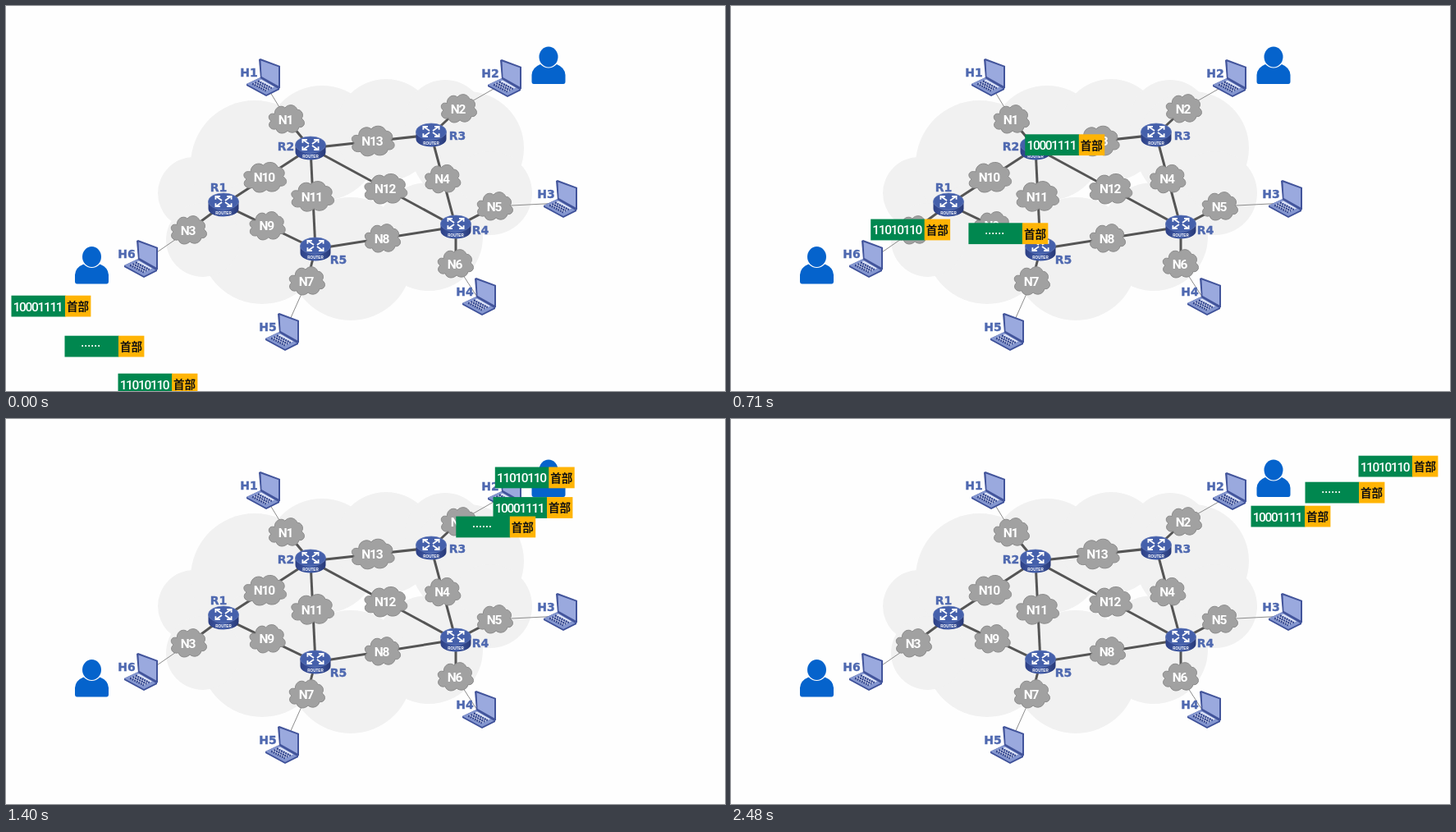
An HTML page for the animation above (2.55 s loop, 876 by 469 pixels).

```html
<!DOCTYPE html>
<html lang="zh">
<head>
<meta charset="utf-8">
<title>Packet switching</title>
<style>
html, body { margin: 0; width: 100%; height: 100%; overflow: hidden; background: #fefefe; }
svg { display: block; width: 876px; height: 469px; }
text { text-anchor: middle; }
.name { font: bold 14px "DejaVu Sans", sans-serif; fill: #4f69b0; stroke: #4f69b0; stroke-width: .4px; }
.net { font: bold 15.5px Roboto, "Liberation Sans", sans-serif; letter-spacing: -1.2px; fill: #fff; }
.tag { font: bold 4.6px "Liberation Sans", sans-serif; fill: #fff; }
.bits { font: 500 15.5px Roboto, "Liberation Sans", sans-serif; letter-spacing: -1.35px; fill: #fff; }
.dots { font: bold 12px "Liberation Sans", sans-serif; fill: #fff; }
.head { font: bold 13.5px "Noto Sans CJK SC", "Noto Sans CJK", sans-serif; fill: #111; }
</style>
</head>
<body>
<svg id="stage" viewBox="0 0 876 469">
  <defs>
    <linearGradient id="side">
      <stop offset="0" stop-color="#2c3f85"/>
      <stop offset=".5" stop-color="#4560ab"/>
      <stop offset="1" stop-color="#273877"/>
    </linearGradient>
    <path id="puff" d="M-14-6C-14-14-6-17-2-13C2-18 10-17 12-11C18-11 20-4 17-1C23 3 20 10 14 9C13 15 5 17 1 13C-4 18-11 16-12 11C-19 13-23 6-18 2C-23-2-20-8-14-6Z"
      fill="#a1a1a1" stroke="#8b8b8b" vector-effect="non-scaling-stroke"/>
    <path id="arrow" d="M2-1L9-6M4-6.2H9.6V-2.2" fill="none" stroke="#fff" stroke-width="1.8"/>
    <g id="router">
      <path d="M-18.5-4V5A18.5 9.5 0 0 0 18.5 5V-4Z" fill="url(#side)"/>
      <ellipse cy="-4" rx="18.5" ry="10" fill="#4560ab" stroke="#6279b8" stroke-width=".7"/>
      <g transform="translate(0 -4)">
        <use href="#arrow"/>
        <use href="#arrow" transform="scale(-1 1)"/>
        <use href="#arrow" transform="scale(1 -1)"/>
        <use href="#arrow" transform="scale(-1 -1)"/>
      </g>
      <text class="tag" y="12">ROUTER</text>
    </g>
    <g id="laptop">
      <path d="M-21 8L-4 0L19 13V15L3 23L-21 10Z" fill="#3d5099"/>
      <path d="M-21 8L-4 0L19 13L3 21Z" fill="#8496cf"/>
      <path d="M-15 8L-3 2.5L13 11.5L2 17Z" fill="#dfe5f7"/>
      <path d="M-14 7.6L3 16.4M-10.6 6L6.4 14.8M-7.2 4.4L9.8 13.2" stroke="#33468f" stroke-width="2.4" stroke-dasharray="2.2 .7"/>
      <path d="M-6-22L-4-23L20-14V13L18 14L-4 1Z" fill="#42549b"/>
      <path d="M-3.5-20.5L18-12.8V10.5L-2.5-1Z" fill="#9aa9de"/>
    </g>
    <g id="user" fill="#0563cc">
      <ellipse rx="11.5" ry="12.5"/>
      <path d="M-18 33Q-20.5 33-20.5 30V22Q-20 13-10 9Q0 18 10 9Q20 13 20.5 22V30Q20.5 33 18 33Z"/>
    </g>
  </defs>
</svg>
<script>
const NS = 'http://www.w3.org/2000/svg';
const stage = document.getElementById('stage');

function add(tag, attrs, parent = stage) {
  const el = document.createElementNS(NS, tag);
  for (const k in attrs) el.setAttribute(k, attrs[k]);
  parent.appendChild(el);
  return el;
}
function label(cls, x, y, str, parent) {
  add('text', { class: cls, x, y }, parent).textContent = str;
}
function put(id, [x, y], sx = 1, sy = 1) {
  add('use', { href: '#' + id, transform: `translate(${x} ${y}) scale(${sx} ${sy})` });
}
function link([x1, y1], [x2, y2], stroke, width) {
  add('line', { x1, y1, x2, y2, stroke, 'stroke-width': width });
}

const routers = { R1: [265, 242], R2: [371, 173], R3: [518, 157], R4: [548, 269], R5: [377, 296] };
const hosts = { H1: [314, 87], H2: [608, 88], H3: [676, 235], H4: [577, 354], H5: [337, 397], H6: [165, 308] };
const nets = { N1: [342, 138], N2: [552, 125], N3: [223, 273], N5: [596, 244], N6: [548, 314], N7: [367, 335] };
const nameSide = { R1: [-6, -16], R2: [-30, 3], R3: [32, 6], R4: [30, 9], R5: [28, 18] };

// Networks between two routers sit just short of the middle
const trunks = 'N4 R3 R4,N8 R5 R4,N9 R1 R5,N10 R1 R2,N11 R2 R5,N12 R4 R2,N13 R3 R2'
  .split(',').map(s => s.split(' '));
for (const [n, a, b] of trunks) {
  nets[n] = routers[a].map((v, i) => v + (routers[b][i] - v) * .48);
}
const access = 'R2 N1 H1,R3 N2 H2,R1 N3 H6,R4 N5 H3,R4 N6 H4,R5 N7 H5'
  .split(',').map(s => s.split(' '));

// Backdrop cloud: cx, cy, r
[
  [229, 228, 44], [303, 193, 78], [385, 167, 70], [463, 151, 62], [535, 139, 49], [562, 173, 69],
  [590, 228, 51], [515, 281, 66], [420, 308, 75], [312, 287, 76], [240, 285, 45]
].forEach(([cx, cy, r]) => add('circle', { cx, cy, r, fill: '#f1f1f1' }));

for (const [, n, h] of access) link(nets[n], [hosts[h][0], hosts[h][1] + 5], '#8c8c8c', 1);
for (const [r, n] of access) link(routers[r], nets[n], '#555', 3);
for (const [, a, b] of trunks) link(routers[a], routers[b], '#555', 3);

for (const n in nets) {
  const [x, y] = nets[n];
  const wide = n.length > 2;
  put('puff', [x, y], wide ? 1.27 : 1.06, wide ? 1.14 : 1.07);
  label('net', x - 1.5, y + 5.5, n);
}
for (const r in routers) {
  const [x, y] = routers[r], [dx, dy] = nameSide[r];
  put('router', [x, y]);
  label('name', x + dx, y + dy, r);
}
for (const h in hosts) {
  const [x, y] = hosts[h];
  put('laptop', [x, y]);
  label('name', x - 18, y - 1, h);
}
put('user', [661, 62]);
put('user', [104.5, 305.5]);

// A packet follows its route, slowing down towards the end
function packet(str, cls, start, span, route) {
  const points = route.map(p => hosts[p] || routers[p] || p);
  const path = document.createElementNS(NS, 'path');
  path.setAttribute('d', 'M' + points.join('L'));
  const el = add('g', {});
  add('rect', { x: -48.5, y: -12.8, width: 66, height: 25.8, fill: '#00874f' }, el);
  add('rect', { x: 17, y: -12.8, width: 31.4, height: 25.8, fill: '#ffb405' }, el);
  label(cls, -16.5, cls === 'bits' ? 6 : 3.5, str, el);
  label('head', 32.5, 5.5, '首部', el);
  return { el, path, start, span, length: path.getTotalLength() };
}

const packets = [
  packet('10001111', 'bits', 30, 1670, [[55, 365.5], 'H6', 'R1', 'R2', 'R3', [605, 98], [682, 118.5]]),
  packet('······', 'dots', 260, 1820, [[120, 414.5], 'H6', 'R1', 'R5', 'R4', [601, 119.5], [660, 90], [748, 89.5]]),
  packet('11010110', 'bits', 447, 1500, [[185, 460.5], [182, 405], [137, 326], 'R1', 'R2', 'R3', [647, 69.5], [813, 57.5]])
];

const LOOP = 2550, STEP = 30, LEAD = 20;
const ease = u => 1 - (1 - u) ** 1.65;

function draw(now) {
  const t = Math.max(0, now) % LOOP;
  const held = t < STEP ? 0 : Math.floor((t - LEAD) / STEP) * STEP + LEAD;
  for (const { el, path, start, span, length } of packets) {
    const u = Math.min(1, Math.max(0, (held - start) / span));
    const { x, y } = path.getPointAtLength(length * ease(u));
    el.setAttribute('transform', `translate(${x.toFixed(1)} ${y.toFixed(1)})`);
  }
}

const begin = performance.now();
function tick() {
  draw(performance.now() - begin);
  requestAnimationFrame(tick);
}
tick();
</script>
</body>
</html>
```
